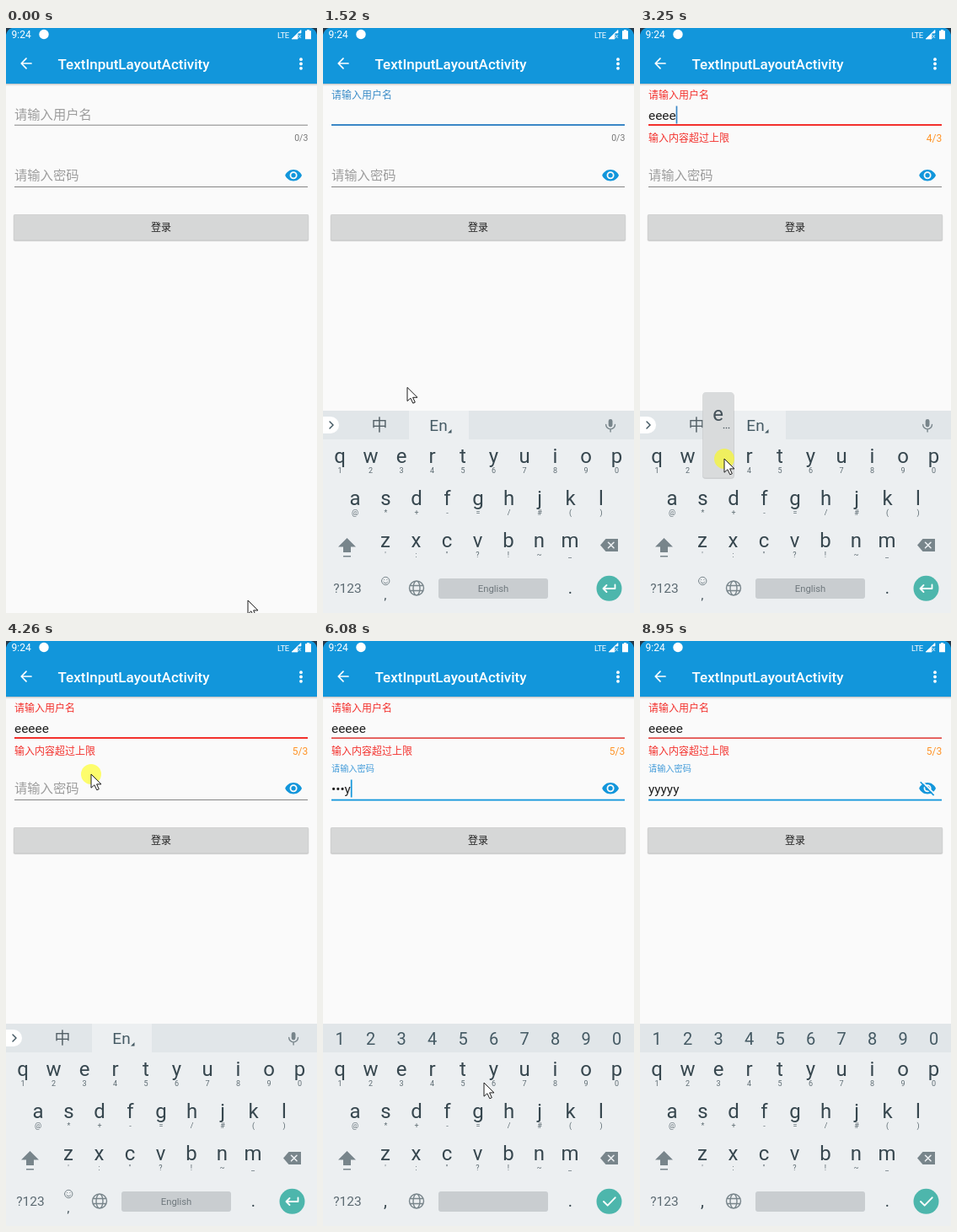
Recreate the animation shown at these times as an HTML page. Size 369 by 694 pixels, loop 9280 ms.

```html
<!DOCTYPE html>
<html lang="zh-CN">
<head>
<meta charset="utf-8">
<title>TextInputLayout</title>
<style>
html, body { margin: 0; width: 100%; height: 100%; overflow: hidden; background: #fafafa; }
svg { display: block; width: 100%; height: 100%; }
text { font-family: Roboto, 'Noto Sans CJK SC', 'Noto Sans CJK', sans-serif; white-space: pre; }
.mid { text-anchor: middle; }
.end { text-anchor: end; }
.line { fill: none; stroke-linecap: round; stroke-linejoin: round; }
</style>
</head>
<body>
<svg id="stage" viewBox="0 0 369 694" preserveAspectRatio="none"></svg>
<script>
const LOOP = 9280;
const BLUE = '#1296db', RED = '#f3302c', KEY = '#37474f', ICON = '#78858b';
const PITCH = 36.5;

// Pointer stops: time, x, y, and 1 for constant speed into the stop
const PATH = [
  [70, 287, 679], [700, 100, 104], [840, 100, 104], [1070, 100, 279, 1], [1780, 100, 511, 1],
  [3680, 100, 511], [4230, 101, 158], [4420, 101, 158], [5300, 191, 524], [6400, 191, 524],
  [7200, 340, 170], [7780, 340, 170], [8100, 351, 530, 1], [8340, 357, 640, 1],
  [8490, 350, 668, 1], [8720, 337, 682]
];
const FIELD_TAPS = [[720, 820], [4230, 4390], [7230, 7310]];
const E_PRESS = [[2140, 2450], [2460, 2600], [2610, 2850], [2930, 3160], [3250, 3630]];
const Y_PRESS = [[5370, 5540], [5580, 5690], [5740, 5850], [5930, 6070], [6150, 6370]];
const E_TYPED = [2380, 2530, 2780, 3080, 3550];
const Y_TYPED = [5460, 5620, 5780, 6000, 6230];
const NAME_FOCUS = 820, PASS_FOCUS = 4420, REVEAL = 7310, KEYBOARD_IN = 1070;

const clamp = v => Math.max(0, Math.min(1, v));
const smooth = v => v * v * (3 - 2 * v);
const mix = (a, b, p) => a + (b - a) * p;
const ramp = (t, start, length) => clamp((t - start) / length);
const within = (t, spans) => spans.some(([a, b]) => t >= a && t < b);
const count = (t, times) => times.filter(v => v <= t).length;

const rect = (x, y, w, h, fill, more = '') =>
  `<rect x="${x}" y="${y}" width="${w}" height="${h}" fill="${fill}" ${more}/>`;
const text = (x, y, size, fill, str, more = '') =>
  `<text x="${x}" y="${y}" font-size="${size}" fill="${fill}" ${more}>${str}</text>`;
const mid = (x, y, size, fill, str, more = '') => text(x, y, size, fill, str, `class="mid" ${more}`);
const stroke = (d, color, width, more = '') =>
  `<path class="line" d="${d}" stroke="${color}" stroke-width="${width}" ${more}/>`;
const dot = (x, y, r, fill, more = '') => `<circle cx="${x}" cy="${y}" r="${r}" fill="${fill}" ${more}/>`;

function keyRow(x, y, letters, hints) {
  return [...letters].map((c, i) =>
    mid(x + i * PITCH, y, 24, KEY, c) +
    mid(x + i * PITCH, y + 12, 9, '#5d6b72', hints[i])).join('');
}

function popup(id, x, letter) {
  return `<g id="${id}">
    ${rect(x - 18.5, 433, 38, 102, '#000', 'rx="4" opacity=".13"')}
    ${rect(x - 18, 432, 36.5, 101.5, '#d9dbdc', 'rx="3.5"')}
    ${mid(x, 466, 24, '#45525a', letter)}
    ${[-1, 0, 1].map(i => dot(x + 10 + i * 3, 474.5, .8, '#45525a')).join('')}</g>`;
}

const header = `
  ${rect(0, 0, 369, 66, BLUE)}
  ${rect(0, 66, 369, 1, '#000', 'opacity=".2"')}${rect(0, 67, 369, 1, '#000', 'opacity=".08"')}
  ${rect(0, 68, 369, 1, '#000', 'opacity=".03"')}
  <path d="M0 0H7Q1.500 1.500 0 8ZM369 0H362Q367.500 1.500 369 8Z" fill="#24394a"/>
  ${text(6.5, 12, 12, '#fff', '9:24')}
  ${dot(45, 7.5, 5.7, '#fff')}
  ${text(322, 11.5, 9.5, '#fff', 'LTE', 'letter-spacing="-.4"')}
  <path d="M339 13 350 2.500V6H346V13ZM347 8l3 4M350 8l-3 4" fill="#fff" stroke="#fff" stroke-width=".7"/>
  <path d="M357 2h3V3.200h2V13.200h-7V3.200h2Z" fill="#fff"/>
  ${stroke('M30 42H18.500M24 36.200 18.200 42l5.800 5.800', '#fff', 1.7)}
  ${text(61.5, 48.5, 17, '#fff', 'TextInputLayoutActivity', 'font-weight="500"')}
  ${[37.2, 42.5, 47.8].map(y => dot(350, y, 1.9, '#fff')).join('')}`;

const form = `
  ${rect(10, 114.7, 348, 1, '#858585')}${rect(10, 114, 348, 2, BLUE, 'id="nameLine"')}
  ${text(10, 108, 15.3, '#9c9c9c', '请输入用户名', 'id="nameLabel"')}
  ${text(10, 109, 15.4, '#212121', '', 'id="nameText"')}
  ${rect(0, 92.5, 1.7, 21, '#3b87c6', 'id="nameCaret"')}
  ${text(10, 135, 12, RED, '输入内容超过上限', 'id="error"')}
  ${text(358.3, 134, 10.5, '#777', '0/3', 'id="counter" class="end"')}
  ${rect(10, 188, 348, 1, '#858585')}${rect(10, 187.7, 348, 1.8, BLUE, 'id="passLine"')}
  ${text(10, 180, 15.3, '#9c9c9c', '请输入密码', 'id="passLabel"')}
  ${text(10, 180.5, 15.4, '#212121', '', 'id="passText"')}
  ${rect(0, 164.5, 1.7, 21, BLUE, 'id="passCaret"')}
  ${dot(341, 174, 16, '#000', 'id="ripple"')}
  <g transform="translate(330.300 163.900) scale(.9)">
    <mask id="cut">${rect(0, 0, 24, 24, '#fff')}<line id="gap" x1="4.400" y1="2.600" stroke="#000" stroke-width="2"/></mask>
    <path mask="url(#cut)" fill="${BLUE}" fill-rule="evenodd" d="M12 4.500C7 4.500 2.730 7.610 1 12c1.730 4.390 6 7.500 11 7.500s9.270-3.110 11-7.500c-1.730-4.390-6-7.500-11-7.500zM12 17a5 5 0 1 1 0-10a5 5 0 0 1 0 10zM12 9a3 3 0 1 0 0 6a3 3 0 0 0 0-6z"/>
    <line id="slash" x1="2.700" y1="3.700" stroke="${BLUE}" stroke-width="1.800"/>
  </g>
  ${rect(8.5, 221, 351, 32.3, '#000', 'rx="2" opacity=".08"')}
  ${rect(9, 221, 350, 31.8, '#000', 'rx="2" opacity=".13"')}
  ${rect(9.5, 221.3, 349, 30.2, '#d6d7d7', 'rx="1.500"')}
  ${mid(184, 241, 12, '#212121', '登录')}`;

const keyboard = `<g id="keyboard">
  ${rect(0, 454, 369, 240, '#eceff1')}${rect(0, 454, 369, 34, '#e1e6e9')}
  <g id="nameStrip">
    ${rect(102, 454, 71, 34, '#eceff1')}
    <path d="M0 461H9a10 10 0 0 1 0 20H0Z" fill="#fff"/>
    ${stroke('M8 467l4 4-4 4', '#455a64', 1.5)}
    ${mid(67, 478, 19, '#546067', '中')}
    ${mid(137, 477.5, 19, '#455a64', 'En')}
    <path d="M152.500 476v4.500H148Z" fill="#455a64"/>
    ${rect(338.7, 464, 4.8, 9.5, ICON, 'rx="2.400"')}
    ${stroke('M335.700 470.500a5.400 5.400 0 0 0 10.800 0M341.100 476v3', ICON, 1.4)}
  </g>
  <g id="passStrip">${[...'1234567890'].map((c, i) => mid(20 + i * PITCH, 479, 20, '#455a64', c)).join('')}</g>
  ${keyRow(20, 516, 'qwertyuiop', '1234567890')}
  ${keyRow(38, 566, 'asdfghjkl', '@*+-=/#()')}
  ${keyRow(74, 616, 'zxcvbnm', '\':"?!~_')}
  <path d="M28.500 605 39 615.500H33V622H24v-6.500H18ZM24 626h9v1.500h-9Z" fill="${ICON}"/>
  <path d="M335.500 606H350V621H335.500L329 613.500Z" fill="${ICON}"/>
  ${stroke('M338.500 610.300l6.500 6.500m0-6.500l-6.500 6.500', '#eceff1', 1.6)}
  ${mid(29, 670, 15.5, '#5c6a72', '?123')}
  <g id="nameKeys">
    ${stroke('M69.500 656a4.700 4.700 0 1 0 9.400 0a4.700 4.700 0 1 0-9.400 0M71.800 657.300q2.400 3 4.800 0M72.500 654.500h.1M75.900 654.500h.1', ICON, 1)}
    ${mid(74, 678, 14, KEY, ',')}
  </g>
  <g id="passKeys">${mid(74, 671, 20, KEY, ',')}</g>
  ${stroke('M102.500 664.500a8.500 8.500 0 1 0 17 0a8.500 8.500 0 1 0-17 0M107 664.500a4 8.500 0 1 0 8 0a4 8.500 0 1 0-8 0M103.500 661.500h15M103.500 667.500h15', ICON, 1.4)}
  ${rect(137, 653, 130, 24, '#c9cdd0', 'rx="3"')}
  ${mid(202, 669, 11.3, '#6f787d', 'English', 'id="spaceLabel"')}
  ${mid(293.5, 671, 20, KEY, '.')}
  ${dot(339.5, 664.8, 15, '#4db6ac')}
  ${stroke('M346.500 660.500v4.500H332.500M336.500 661l-4 4 4 4', '#fff', 1.8, 'id="enter"')}
  ${stroke('M333 665l4.700 4.700 9-9.400', '#fff', 1.9, 'id="check"')}
</g>`;

const pointer = `
  ${dot(0, 0, 12, '#ffff00', 'id="press" opacity=".57"')}
  <path id="arrow" d="M0 0V16.200L3.900 12.800 6.800 18.800 9.300 17.700 6.600 11.900H12Z" fill="#fff" stroke="#1c1c1c" stroke-linejoin="round"/>`;

const stage = document.getElementById('stage');
stage.innerHTML = form + header + keyboard + popup('popE', 92.5, 'e') + popup('popY', 202.5, 'y') + pointer;

const el = {};
stage.querySelectorAll('[id]').forEach(node => el[node.id] = node);

const set = (id, attrs) => { for (const k in attrs) el[id].setAttribute(k, attrs[k]); };
const show = (id, on) => { el[id].style.display = on ? '' : 'none'; };
const write = (id, str) => { if (el[id].textContent !== str) el[id].textContent = str; };
const blend = (from, to, p) => `rgb(${from.map((v, i) => Math.round(mix(v, to[i], p)))})`;

function pointerAt(t) {
  const i = PATH.findIndex(stop => stop[0] > t);
  if (i === 0) return PATH[0].slice(1, 3);
  if (i < 0) return PATH[PATH.length - 1].slice(1, 3);
  const [t0, x0, y0] = PATH[i - 1], [t1, x1, y1, even] = PATH[i];
  const u = (t - t0) / (t1 - t0), p = even ? u : smooth(u);
  return [mix(x0, x1, p), mix(y0, y1, p)];
}

// The caret restarts its one second blink at each edit
function caretOn(t, resets) {
  const last = Math.max(...resets.filter(v => v <= t));
  return last > 0 && (t - last) % 1000 < 500;
}

function drawName(t) {
  const p = smooth(ramp(t, NAME_FOCUS, 160)), n = count(t, E_TYPED);
  const over = n > 3, focused = t < PASS_FOCUS;
  set('nameLabel', {
    y: mix(108, 83.5, p), 'font-size': mix(15.3, 12, p),
    fill: over ? RED : blend([156, 156, 156], [58, 140, 200], p)
  });
  set('nameLine', {
    opacity: p, fill: over ? RED : '#3b87c6',
    y: focused ? 114 : 114.5, height: focused ? 2 : 1.3
  });
  write('nameText', 'e'.repeat(n));
  set('nameCaret', { x: 10 + n * 8.16 });
  show('nameCaret', focused && caretOn(t, [NAME_FOCUS, ...E_TYPED]));
  set('error', { opacity: ramp(t, E_TYPED[3], 160) });
  write('counter', n + '/3');
  set('counter', { fill: over ? '#ff9428' : '#777', 'font-size': over ? 12 : 10.5, y: over ? 135 : 134 });
}

function drawPassword(t) {
  const p = smooth(ramp(t, PASS_FOCUS, 170)), n = count(t, Y_TYPED), open = t >= REVEAL;
  const hidden = open ? 0 : Math.max(0, n - 1);
  set('passLabel', {
    y: mix(180, 155, p), 'font-size': mix(15.3, 10.2, p),
    fill: blend([156, 156, 156], [66, 155, 217], p)
  });
  set('passLine', { opacity: p });
  write('passText', '•'.repeat(hidden) + 'y'.repeat(n - hidden));
  set('passCaret', { x: 10 + hidden * 5.2 + (n - hidden) * 7.25 });
  show('passCaret', t >= PASS_FOCUS && caretOn(t, [PASS_FOCUS, ...Y_TYPED, REVEAL]));

  set('ripple', {
    r: mix(8, 16, ramp(t, 7230, 130)),
    opacity: .13 * ramp(t, 7230, 80) * (1 - ramp(t, 7440, 260))
  });
  const s = smooth(ramp(t, 7400, 240)) * 17.7;
  set('slash', { x2: 2.7 + s, y2: 3.7 + s });
  set('gap', { x2: 4.4 + s, y2: 2.6 + s });
}

function drawKeyboard(t) {
  const p = ramp(t, KEYBOARD_IN, 150), secret = t >= PASS_FOCUS;
  show('keyboard', t >= KEYBOARD_IN);
  set('keyboard', { transform: `translate(0 ${46 * (1 - p) ** 2})`, opacity: mix(.62, 1, p) });
  ['nameStrip', 'nameKeys', 'spaceLabel', 'enter'].forEach(id => show(id, !secret));
  ['passStrip', 'passKeys', 'check'].forEach(id => show(id, secret));
  show('popE', within(t, E_PRESS));
  show('popY', within(t, Y_PRESS));
}

function drawPointer(t) {
  const [x, y] = pointerAt(t), move = `translate(${x} ${y})`;
  set('arrow', { transform: move });
  set('press', { transform: move });
  show('arrow', t < 8900);
  show('press', within(t, [...FIELD_TAPS, ...E_PRESS, ...Y_PRESS]));
}

function draw(t) {
  drawName(t);
  drawPassword(t);
  drawKeyboard(t);
  drawPointer(t);
}

const start = performance.now();
function tick() {
  draw((performance.now() - start) % LOOP);
  requestAnimationFrame(tick);
}
draw(0);
requestAnimationFrame(tick);
</script>
</body>
</html>
```
